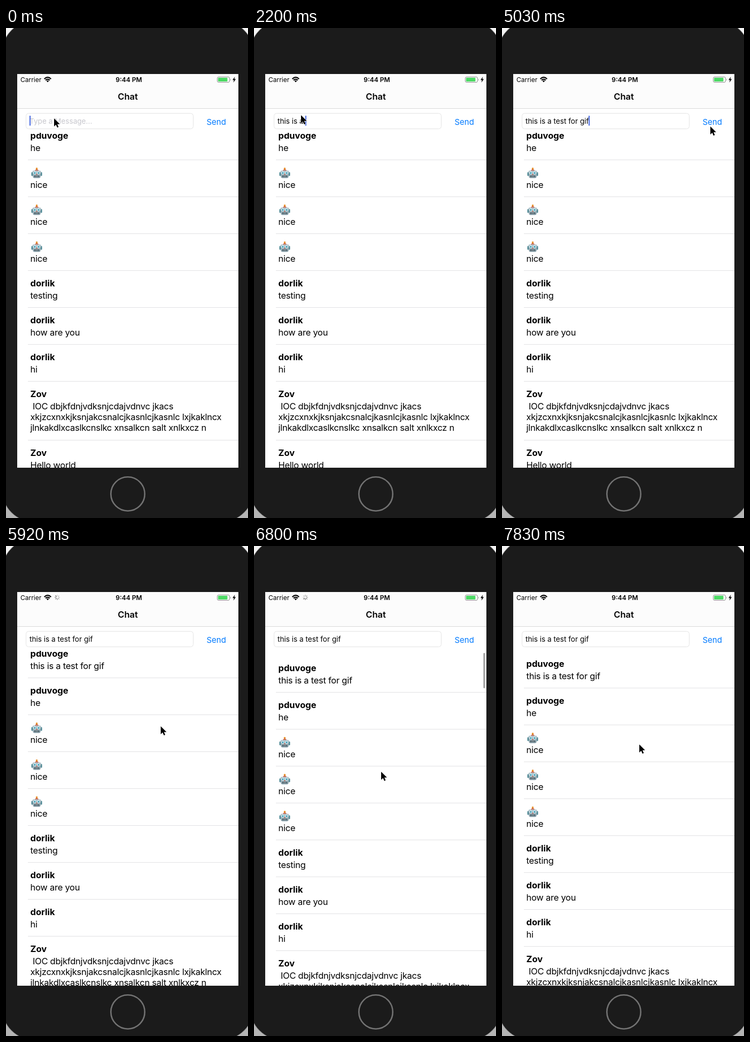
An HTML page that plays this animation: 453 by 916 pixels, repeating every 8 s.

```html
<!DOCTYPE html>
<html lang="en">
<head>
<meta charset="utf-8">
<title>Chat</title>
<style>
  html, body { margin: 0; width: 100%; height: 100%; overflow: hidden; background: #ededed; }
  svg { display: block; width: 453px; height: 916px; }
  text { font-family: Inter, Roboto, sans-serif; white-space: pre; fill: #000; }
  .name { font-size: 16.5px; font-weight: 700; }
  .msg { font-size: 16.5px; letter-spacing: -0.26px; }
  .field { font-size: 13.6px; }
  .status { font-size: 12px; }
  .bold { font-weight: 600; }
</style>
</head>
<body>
<svg viewBox="0 0 453 916" xmlns="http://www.w3.org/2000/svg">
  <defs>
    <linearGradient id="backdrop" x2="0" y2="1">
      <stop offset="0" stop-color="#f4f4f4"/><stop offset="1" stop-color="#b4b4b4"/>
    </linearGradient>
    <linearGradient id="metal" x2="0" y2="1">
      <stop offset="0" stop-color="#b9cbd2"/><stop offset="1" stop-color="#7f98a3"/>
    </linearGradient>
    <clipPath id="table"><rect x="21" y="196" width="414" height="626"/></clipPath>
    <g id="robot">
      <path d="M11 3V7" stroke="#8a6a5a" stroke-width="1.6"/>
      <circle cx="11" cy="2.4" r="1.9" fill="#e8912d"/>
      <path d="M7.5 6.5a3.5 2.5 0 0 1 7 0z" fill="#c8553d"/>
      <rect x="1" y="9" width="3" height="7" rx="1.2" fill="#4d8793"/>
      <rect x="18" y="9" width="3" height="7" rx="1.2" fill="#4d8793"/>
      <path d="M5 6H17Q19 6 19 9L18 18Q17.5 20 15.5 20H6.5Q4.5 20 4 18L3 9Q3 6 5 6Z" fill="url(#metal)"/>
      <g fill="#e9fbff"><circle cx="7.4" cy="10.5" r="2.5"/><circle cx="14.6" cy="10.5" r="2.5"/></g>
      <g fill="#1d8ba5"><circle cx="7.4" cy="10.5" r="1.5"/><circle cx="14.6" cy="10.5" r="1.5"/></g>
      <path d="M11 11.5l1.3 2.5H9.7z" fill="#c8553d"/>
      <rect x="6.5" y="15.3" width="9" height="3" rx="1" fill="#34474f"/>
      <path d="M8.7 15.3v3M11 15.3v3M13.3 15.3v3" stroke="#d7e5ea" stroke-width=".8"/>
    </g>
  </defs>

  <rect width="453" height="916" fill="url(#backdrop)"/>
  <rect x="-8" y="-14" width="472" height="938" rx="62" fill="#1b1b1b" stroke="#8c8c8c"/>
  <circle cx="228" cy="871" r="31.7" fill="#1b1b1b" stroke="#737373" stroke-width="2.6"/>
  <rect x="21" y="86" width="414" height="736" fill="#fff"/>

  <g clip-path="url(#table)">
    <g id="list">
      <g id="rules" fill="#e2e2e4"></g>
      <rect id="press" x="21" y="70" width="414" height="69" fill="#d9d9d9"/>
    </g>
    <rect id="scrollbar" x="429.5" y="200" width="2.8" height="66" rx="1.4" fill="#979797"/>
  </g>

  <rect x="21" y="86" width="414" height="64" fill="#fcfcfc"/>
  <rect x="21" y="150" width="414" height="1" fill="#dadada"/>
  <text class="status" x="27" y="101">Carrier</text>
  <path d="M71.7 95.2Q78 89 84.3 95.2M74.1 97.7Q78 94 81.9 97.7" fill="none" stroke="#000" stroke-width="2.3"/>
  <path d="M78 101.5l-2.3-2.4q2.3-2 4.6 0z"/>
  <g id="spinner" transform="translate(96 96)" stroke="#555" stroke-width="1.2" stroke-linecap="round"></g>
  <text class="status bold" x="230" y="101" text-anchor="middle">9:44 PM</text>
  <rect x="395.5" y="91.5" width="23" height="10" rx="2.5" fill="none" stroke="#8e8e8e"/>
  <rect x="397" y="93" width="17.5" height="7" rx="1" fill="#4cd964"/>
  <path d="M420 94.5q1.8 2 0 4z" fill="#8e8e8e"/>
  <path d="M428.5 91L424 97.2H426.7L425.6 102L430.2 95.6H427.4Z"/>
  <text class="bold" x="228" y="134" text-anchor="middle" font-size="16.5">Chat</text>

  <rect x="37.5" y="159.5" width="313" height="29" rx="5" fill="#fff" stroke="#e4e4e4"/>
  <text id="hint" class="field" x="44" y="178.5" style="fill:#c7c7cd">Type a Message...</text>
  <text id="typed" class="field" x="44" y="178.5"></text>
  <rect id="caret" y="164" width="2" height="18.5" fill="#4668e0"/>
  <text x="393.7" y="181" text-anchor="middle" font-size="15" style="fill:#007aff">Send</text>

  <path id="cursor" d="M0 0V15L3.5 11.7L6 17.2L8.4 16.1L6 10.8H10.8Z" stroke="#fff" stroke-width="1.2" paint-order="stroke"/>
</svg>
<script>
(() => {
  const LOOP = 8000, STEP = 147.7, ROW = 69, LINE = 20.3;
  const MESSAGE = "this is a test for gif";
  const $ = id => document.getElementById(id);
  const set = (id, key, value) => $(id).setAttribute(key, value);

  function add(parent, tag, attrs, text) {
    const el = document.createElementNS("http://www.w3.org/2000/svg", tag);
    for (const key in attrs) el.setAttribute(key, attrs[key]);
    if (text) el.textContent = text;
    return parent.appendChild(el);
  }

  // An empty sender stands for the robot.
  const rows = [
    ["pduvoge", MESSAGE], ["pduvoge", "he"],
    ["", "nice"], ["", "nice"], ["", "nice"],
    ["dorlik", "testing"], ["dorlik", "how are you"], ["dorlik", "hi"],
    ["Zov", " IOC dbjkfdnjvdksnjcdajvdnvc jkacs",
      "xkjzcxnxkjksnjakcsnalcjkasnlcjkasnlc lxjkaklncx",
      "jlnkakdlxcaslkcnslkc xnsalkcn salt xnlkxcz n"],
    ["Zov", "Hello world"]
  ];

  let y = 0;
  for (const [sender, ...lines] of rows) {
    if (sender) add($("list"), "text", { class: "name", x: 45.5, y: y + 30 }, sender);
    else add($("list"), "use", { href: "#robot", x: 46.5, y: y + 14.5 });
    lines.forEach((line, i) =>
      add($("list"), "text", { class: "msg", x: 45.5, y: y + 52.5 + i * LINE }, line));
    y += ROW + Math.round((lines.length - 1) * LINE);
    add($("rules"), "rect", { x: 41, y, width: 394, height: 1 });
  }

  const spokes = Array.from({ length: 8 }, (_, i) =>
    add($("spinner"), "path", { d: "M0-2.4V-4.5", transform: `rotate(${i * 45})` }));

  // Progress from 0 to 1 between two steps
  const ramp = (n, from, to) => Math.min(1, Math.max(0, (n - from) / (to - from)));
  const easeOut = p => 1 - (1 - p) ** 2;
  const within = (n, from, to) => n >= from && n < to;

  const typedCount = n => Math.round(
    7 * ramp(n, 3, 8) + 2 * ramp(n, 9, 12) + ramp(n, 14, 15) +
    4 * ramp(n, 15, 19) + 8 * ramp(n, 23, 32));

  const isBusy = n => within(n, 5, 8) || within(n, 10, 13) || within(n, 16, 22) ||
    within(n, 24, 34) || within(n, 37, 53);

  // Pointer moves: first step, last step, dx, dy
  const moves = [[0, 2, -2, -6], [19, 22, 270, 4], [32, 34, 32, 17],
    [37, 44, -149, 227], [44, 46, -3, 11], [46, 53, 19, -51]];

  function pointer(n) {
    let px = 90, py = 169;
    for (const [from, to, dx, dy] of moves) {
      const p = easeOut(ramp(n, from, to));
      px += dx * p;
      py += dy * p;
    }
    return `translate(${px} ${py})`;
  }

  function draw(time) {
    // The screen refreshes in even steps.
    const n = Math.floor((time % LOOP + 17) / STEP);
    const count = typedCount(n), typed = $("typed");
    typed.textContent = MESSAGE.slice(0, count);
    set("hint", "opacity", count ? 0 : 1);
    set("caret", "x", 44 + (count ? typed.getComputedTextLength() - 0.5 : 0));
    set("caret", "opacity", n < 36 ? 1 - ramp(n, 0, 2) + ramp(n, 3, 4) : 0);

    // The list is pulled down, then springs back to its top edge.
    const pull = 27 * ramp(n, 44, 46) - 8 * easeOut(ramp(n, 46, 50));
    const sent = n >= 38;
    set("list", "transform", `translate(0 ${177 + pull - (sent ? 0 : ROW)})`);
    set("press", "opacity", n === 44 ? 1 : 0);
    set("scrollbar", "opacity", ramp(n, 44, 45) - ramp(n, 48, 51));

    set("spinner", "opacity", isBusy(n) ? 1 : 0);
    spokes.forEach((s, i) => s.setAttribute("opacity", 0.3 + 0.1 * ((i - n + 64) % 8)));
    set("cursor", "transform", pointer(n));
  }

  const start = performance.now();
  function tick() {
    draw(performance.now() - start);
    requestAnimationFrame(tick);
  }
  tick();
})();
</script>
</body>
</html>
```
